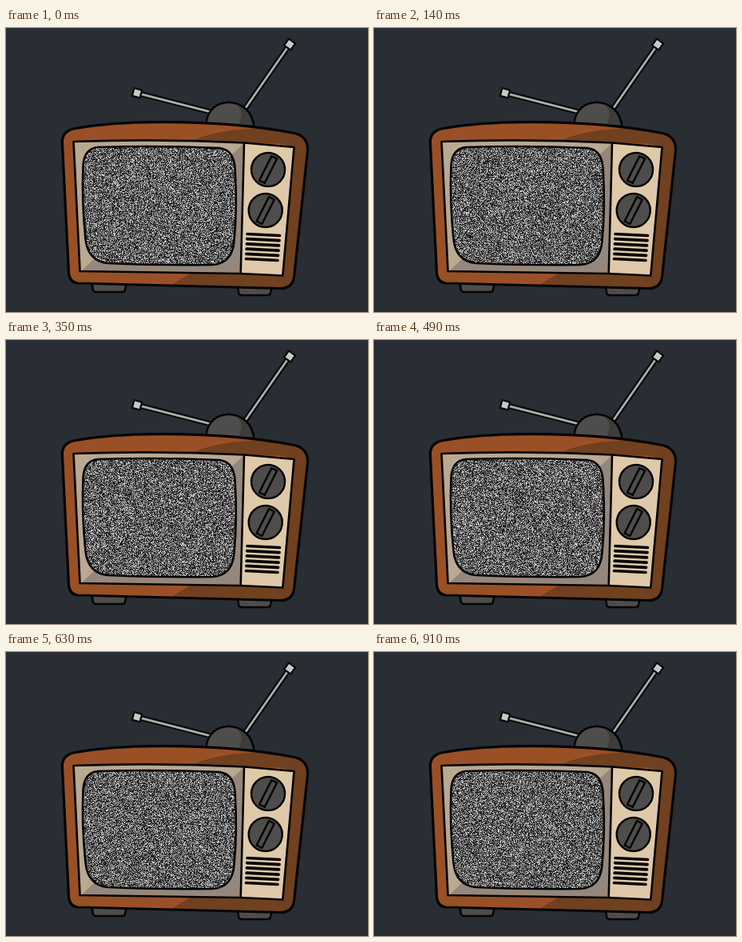
Recreate the animation shown at these times as an HTML page with a canvas. Size 453x355 px, loop 0.98 s.

```html
<!DOCTYPE html>
<html lang="en">
<head>
<meta charset="utf-8">
<title>Television static</title>
<style>
  html, body { margin: 0; width: 100%; height: 100%; overflow: hidden; background: #292d34; }
  canvas { display: block; width: 453px; height: 355px; }
</style>
</head>
<body>
<canvas id="tv" width="453" height="355"></canvas>
<script>
const STEP = 70, STEPS = 14;
const INK = '#050505', METAL = '#4e4d4b';
const ctx = document.getElementById('tv').getContext('2d');

const body = new Path2D('M70.5 145 Q69 130 85 125.8 Q135 117 200 117.7 Q290 118 361 131.5 Q378 135.5 377.5 153 L360.5 311 Q358.5 325.5 343 325.5 L90 319 Q79.5 318 78.5 306 Z');
const panel = new Path2D('M84.5 142 Q190 138 298 143.5 L360.5 149 L346.3 309.5 L293.7 307 L92.5 304 Z');
const screen = new Path2D('M96.5 172 Q97.5 151 115 149 Q190 146.5 267 150 Q285.5 152 286.7 177 Q289.5 225 285.5 266 Q283.5 294 259 296 Q190 297 127 294 Q102.5 291 99.5 264 Q94.5 215 96.5 172 Z');

// Static is painted on its own small canvas, then clipped to the glass.
const glass = { x: 94, y: 146, w: 196, h: 152 };
const snow = document.createElement('canvas');
snow.width = glass.w;
snow.height = glass.h;
const snowCtx = snow.getContext('2d');
const grain = snowCtx.createImageData(glass.w, glass.h);

function random(seed) {
  return () => {
    seed = (seed + 0x6D2B79F5) | 0;
    let v = Math.imul(seed ^ (seed >>> 15), 1 | seed);
    v ^= v + Math.imul(v ^ (v >>> 7), 61 | v);
    return ((v ^ (v >>> 14)) >>> 0) / 4294967296;
  };
}

function shape(path, fill, width = 3) {
  const p = typeof path === 'string' ? new Path2D(path) : path;
  if (fill) {
    ctx.fillStyle = fill;
    ctx.fill(p);
  }
  if (width) {
    ctx.lineWidth = width;
    ctx.strokeStyle = INK;
    ctx.stroke(p);
  }
}

function clipped(path, draw) {
  ctx.save();
  ctx.clip(path);
  draw();
  ctx.restore();
}

function line(x1, y1, x2, y2, width, color) {
  ctx.beginPath();
  ctx.moveTo(x1, y1);
  ctx.lineTo(x2, y2);
  ctx.lineWidth = width;
  ctx.strokeStyle = color;
  ctx.stroke();
}

function block(x, y, w, h, angle, fill, width) {
  const p = new Path2D();
  p.rect(-w / 2, -h / 2, w, h);
  ctx.save();
  ctx.translate(x, y);
  ctx.rotate(angle);
  shape(p, fill, width);
  ctx.restore();
}

function antenna(x1, y1, x2, y2) {
  line(x1, y1, x2, y2, 6.8, INK);
  line(x1, y1, x2, y2, 2.8, '#acacac');
  block(x2, y2, 10, 10, Math.atan2(y2 - y1, x2 - x1), '#c9c9c9', 2.2);
}

function knob(x, y) {
  const p = new Path2D();
  p.arc(x, y, 21, 0, Math.PI * 2);
  shape(p, METAL, 2.5);
  block(x, y, 7.5, 34, 0.47, METAL, 2.5);
}

function drawSnow(step) {
  const next = random(977 * (step + 1));
  const px = grain.data;
  for (let i = 0; i < px.length; i += 4) {
    px[i] = px[i + 1] = px[i + 2] = 15 + 215 * Math.pow(next(), 1.6);
    px[i + 3] = 255;
  }
  snowCtx.putImageData(grain, 0, 0);
  ctx.drawImage(snow, glass.x, glass.y);
}

function draw(step) {
  ctx.fillStyle = '#292d34';
  ctx.fillRect(0, 0, 453, 355);
  ctx.lineJoin = 'round';
  ctx.lineCap = 'round';

  antenna(258, 105.3, 164, 81.3);
  antenna(299, 101, 355, 20.5);
  const dome = new Path2D('M250.5 121 C251 83 308 83 310.5 125 Z');
  shape(dome, METAL, 0);
  clipped(dome, () => shape('M286 90 Q300 106 290 124 L315 128 V90 Z', '#3d3c3a', 0));
  shape(dome, null, 2.6);

  shape('M107 317 L109 328 Q110 330 113 330 H145 Q149 330 149 327 L151 317 Z', METAL, 2.6);
  shape('M290 322 L291 331 Q292 334 295 334 H327 Q331 334 331 331 L333 322 Z', METAL, 2.6);

  shape(body, '#9a5026', 0);
  clipped(body, () => {
    shape('M232 142 Q262 126 328 125 L390 120 V340 H180 Q206 320 236 304 L340 300 L350 145 Z', '#70401f', 0);
  });
  shape(body, null, 3.2);

  shape(panel, '#baa893', 0);
  clipped(panel, () => shape('M298 144 L280 160 L112 287 L92 306 L300 312 Z', '#95877b', 0));
  clipped(panel, () => shape('M298 140 L370 140 V315 H293.5 Z', '#dfc9a9', 0));
  line(298, 143.5, 293.7, 307, 2.6, INK);
  shape(panel, null, 2.7);

  clipped(screen, () => drawSnow(step));
  shape(screen, null, 2.6);

  knob(328, 177);
  knob(324.7, 228);
  for (let i = 0; i < 6; i++) {
    const y = 257.5 + i * 6.2;
    line(302 - i * 0.3, y, 342.5 - i * 0.5, y + 2, 3.7, INK);
  }
}

let shown = -1;
function tick(now) {
  const step = Math.floor(now / STEP) % STEPS;
  if (step !== shown) draw(shown = step);
  requestAnimationFrame(tick);
}
tick(0);
</script>
</body>
</html>
```
